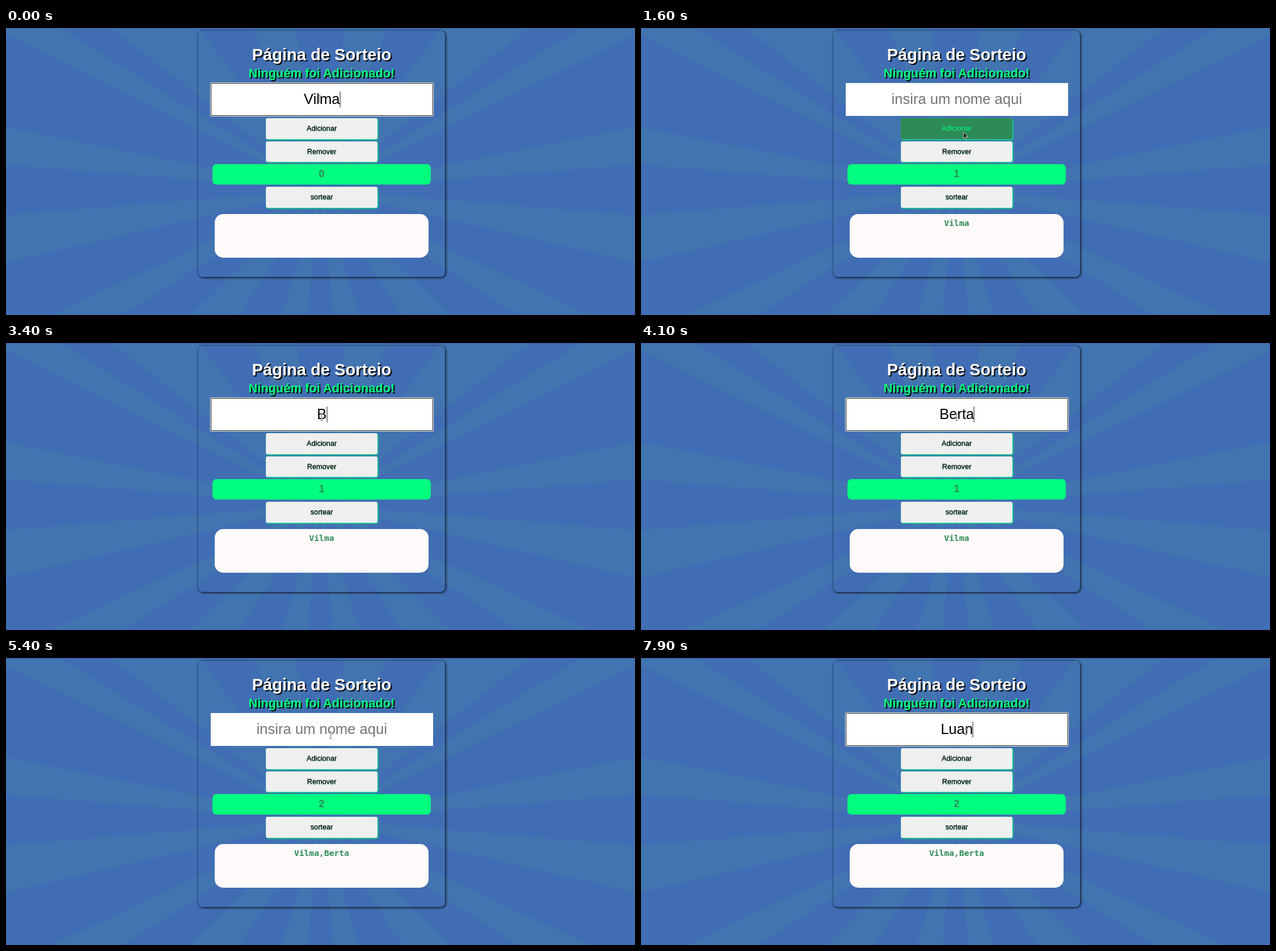
An HTML page that plays this animation: 1106 by 506 pixels, repeating every 8000 ms.

```html
<!DOCTYPE html>
<html lang="pt">
<head>
<meta charset="utf-8">
<title>Sorteio</title>
<style>
  html, body { margin: 0; width: 100%; height: 100%; overflow: hidden; background: #416db4; }
  #stage { position: relative; width: 1106px; height: 506px; overflow: hidden; font-family: "Liberation Sans", Arial, sans-serif; }
  #stage > * { position: absolute; box-sizing: border-box; }
  svg { left: 0; top: 0; }
  .line { left: 338px; width: 434px; text-align: center; white-space: pre; font-weight: bold; text-shadow: 2px 2px 1px #000; }
  #title { top: 27px; line-height: 40px; font-size: 29px; color: #fff; }
  #status { top: 65px; line-height: 30px; font-size: 21.8px; color: #00ff7f; }
  #panel { left: 338px; top: 5px; width: 434px; height: 434px; border-radius: 8px; box-shadow: 1px 1px 4px #000; }
  #field { left: 360px; top: 97px; width: 390.5px; height: 58px; background: #fff; line-height: 57px; text-align: center; font-size: 25.5px; color: #757575; }
  #field.focus { outline: 1px solid #fff; border: 1px solid #101010; line-height: 55px; border-radius: 1px; }
  #field.filled { color: #000; }
  #field span { white-space: pre; }
  #caret { top: 111.5px; width: 1px; height: 28.5px; background: #222; }
  .button { left: 457px; width: 196px; height: 36.5px; line-height: 36.5px; border-radius: 3px; background: #efefef; color: #000; font-size: 12.7px; text-align: center; box-shadow: 1px 1px 3px #00ff7f; text-shadow: .5px .5px 1px #2e8b57; }
  .button.hover { background: #2e8b57; color: #00ff7f; }
  #count { left: 363px; top: 240px; width: 384px; height: 36px; line-height: 35px; border-radius: 7px; background: #00ff7f; color: #2e8b57; font-weight: bold; font-size: 18px; text-align: center; }
  #list { left: 367px; top: 327.5px; width: 376px; height: 77.5px; padding-top: 6px; line-height: 20px; border-radius: 15px; background: #fffafa; color: #2e8b57; font: bold 14.6px/20px "DejaVu Sans Mono", monospace; text-align: center; }
</style>
</head>
<body>
<div id="stage">
  <svg width="1106" height="506">
    <path id="rays" fill="#4274b0"/>
    <rect width="1106" height="1" fill="#3a62a2"/>
  </svg>
  <div id="panel"></div>
  <div id="title" class="line">Página de Sorteio</div>
  <div id="status" class="line">Ninguém foi Adicionado!</div>
  <div id="field"><span id="value"></span></div>
  <div id="caret"></div>
  <div id="add" class="button" style="top:159px">Adicionar</div>
  <div class="button" style="top:199.5px">Remover</div>
  <div id="count"></div>
  <div class="button" style="top:280px">sortear</div>
  <div id="list"></div>
  <svg width="1106" height="506">
    <path d="M737 404l4-4M740 404.5l1.500-1.500" stroke="#555" stroke-width=".8"/>
    <g id="arrow"><path d="M0 0V10.500L2.500 8.300L4.200 12L5.900 11.200L4.300 7.600H7.500Z" fill="#111" stroke="#ddd" stroke-width=".8"/></g>
    <g id="beam" fill="none"><path d="M-2-5.500H2M0-5.500V5.500M-2 5.500H2" stroke="#fff" stroke-width="2.200"/><path d="M-2-5.500H2M0-5.500V5.500M-2 5.500H2" stroke="#666" stroke-width="1"/></g>
  </svg>
</div>
<script>
const $ = id => document.getElementById(id);
const LOOP = 8000, MID = 555;
const first = "Vilma", second = "Berta", third = "Luan";

// Left-hand ray edges, mirrored to the right.
const edges = [[0, 12, 95, 0], [0, 175, 0, 241], [0, 330, 0, 413], [80, 506, 205, 506],
  [325, 506, 410, 506], [485, 506, 530, 506], [185, 0, 340, 0], [435, 0, 510, 0]];
const ray = ([a, b, c, d], flip) => {
  const x = v => flip ? 1106 - v : v;
  const corner = a === 0 && d === 0 ? `L${x(0)} 0` : "";
  return `M553 285L${x(a)} ${b}${corner}L${x(c)} ${d}Z`;
};
$("rays").setAttribute("d", edges.map(e => ray(e) + ray(e, true)).join(""));

const typed = (word, times) => times.map((t, i) => [t, word.slice(0, i + 1)]);
const texts = [[0, first], [1600, ""], ...typed(second, [3400, 3600, 3800, 4000, 4100]),
  [5200, ""], ...typed(third, [6700, 7000, 7800, 7900])];
const added = [[0, []], [1600, [first]], [5200, [first, second]]];
const focus = [[0, true], [1600, false], [2500, true], [5200, false], [5500, true]];
const blinks = [0, 700, 1200, 1600, 2500, 3000, 3400, 4600, 5100, 5200, 5500, 6300, 6700, 7600, 7800];
const path = [[0, 551, 124], [600, 551, 124], [1300, 567, 184], [1800, 567, 184], [1900, 565, 190],
  [2300, 555, 131], [4500, 555, 131], [5000, 565, 163], [5200, 568, 176], [5400, 571, 136], [5500, 571, 130], [LOOP, 571, 130]];

const at = (steps, t) => steps.filter(s => s[0] <= t).pop()[1];

function pointer(t) {
  const i = path.findIndex(p => p[0] > t);
  const [t0, x0, y0] = path[i - 1], [t1, x1, y1] = path[i];
  const k = (t - t0) / (t1 - t0);
  return [x0 + (x1 - x0) * k, y0 + (y1 - y0) * k];
}

function draw(ms) {
  const t = Math.floor(ms % LOOP / 100) * 100;
  const text = at(texts, t), names = at(added, t), active = at(focus, t);
  $("value").textContent = text || "insira um nome aqui";
  $("field").className = (active ? "focus " : "") + (text ? "filled" : "");
  $("count").textContent = names.length;
  $("list").textContent = names.join(",");

  const width = text ? $("value").getBoundingClientRect().width : 0;
  $("caret").style.left = MID + width / 2 + "px";
  $("caret").style.visibility = blinks.filter(b => b <= t).length % 2 ? "visible" : "hidden";

  const [x, y] = pointer(t), inField = y < 155;
  $("add").classList.toggle("hover", y >= 159 && y < 196);
  for (const [id, on] of [["beam", inField], ["arrow", !inField]]) {
    $(id).setAttribute("transform", `translate(${x} ${y})`);
    $(id).setAttribute("visibility", on ? "visible" : "hidden");
  }
}

const start = performance.now();
function tick() {
  draw(performance.now() - start);
  requestAnimationFrame(tick);
}
tick();
</script>
</body>
</html>
```
